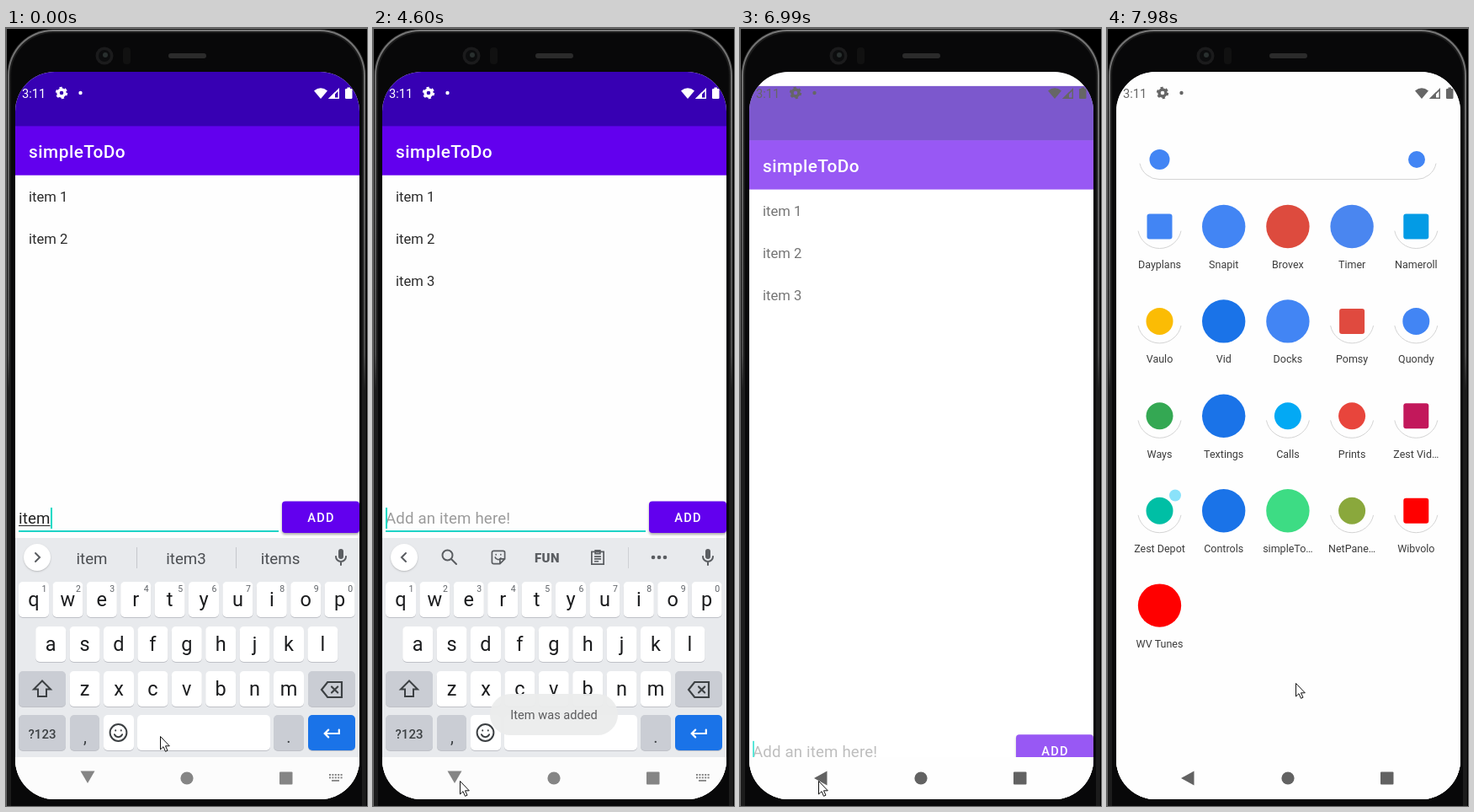
Animation, 429 px wide and 923 px high, one loop 8 s. Source, as an HTML page with a canvas:

```html
<!DOCTYPE html>
<html lang="en">
<head>
<meta charset="utf-8">
<title>simpleToDo</title>
<style>
html, body { margin: 0; width: 100%; height: 100%; overflow: hidden; background: #000; }
canvas { display: block; }
</style>
</head>
<body>
<canvas id="stage" width="429" height="923"></canvas>
<script>
const c = document.getElementById('stage').getContext('2d');
const LOOP = 8000;

const moments = [0, 1410];
for (const [a, b, n] of [[610, 1130, 4], [1840, 2770, 8], [2920, 3040, 2], [3310, 3670, 4],
  [3940, 4870, 8], [5020, 5600, 5], [5910, 6870, 8], [6990, 7980, 8]])
  for (let i = 0; i < n; i++) moments.push(a + (b - a) * i / (n - 1));
const snap = t => Math.max(...moments.filter(m => m <= t + 6));

// Pointer path: [time, x, y]
const path = [[0, 183, 840], [1750, 183, 840], [2240, 368, 590], [2800, 368, 590], [3040, 352, 435],
  [3200, 352, 435], [3440, 284, 177], [3670, 268, 430], [3800, 268, 430], [4560, 103, 893],
  [5850, 103, 893], [6090, 189, 555], [6310, 111, 893], [6460, 111, 893], [6870, 93, 893],
  [7200, 93, 893], [7900, 224, 777]];

const clamp = v => Math.min(1, Math.max(0, v));

function pointerAt(t) {
  const i = path.findIndex(p => p[0] > t);
  if (i < 0) return path[path.length - 1].slice(1);
  const [t0, x0, y0] = path[i - 1], [t1, x1, y1] = path[i];
  const k = (t - t0) / (t1 - t0);
  return [Math.round(x0 + (x1 - x0) * k), Math.round(y0 + (y1 - y0) * k)];
}

function rect(x, y, w, h, color) {
  c.fillStyle = color;
  c.fillRect(x, y, w, h);
}

function round(x, y, w, h, r, color) {
  c.fillStyle = color;
  c.beginPath();
  c.roundRect(x, y, w, h, r);
  c.fill();
}

const disc = (x, y, r, color) => round(x - r, y - r, 2 * r, 2 * r, r, color);

function shape(d, color) {
  c.fillStyle = color;
  c.fill(new Path2D(d));
}

function text(s, x, y, size, color, { align = 'left', weight = 400, spacing = 0 } = {}) {
  c.font = `${weight} ${size}px Roboto, sans-serif`;
  c.textAlign = align;
  c.letterSpacing = spacing + 'px';
  c.fillStyle = color;
  c.fillText(s, x, y);
}

const center = (s, x, y, size, color, more) => text(s, x, y, size, color, { align: 'center', ...more });

// Line icon on a 24-unit grid
function icon(d, x, y, color, scale = 1, width = 2) {
  c.save();
  c.translate(x - 12 * scale, y - 12 * scale);
  c.scale(scale, scale);
  c.strokeStyle = color;
  c.lineWidth = width;
  c.lineCap = 'round';
  c.stroke(new Path2D(d));
  c.restore();
}

function withShadow(color, blur, dy, draw) {
  c.save();
  c.shadowColor = color;
  c.shadowBlur = blur;
  c.shadowOffsetY = dy;
  draw();
  c.restore();
}

// Lower rim of a pill whose end caps sit at x0 and x1
function rim(x0, x1, y, r) {
  c.strokeStyle = '#d4d4d4';
  c.lineWidth = 1;
  c.beginPath();
  c.arc(x1, y, r, 0.2, Math.PI / 2);
  c.arc(x0, y, r, Math.PI / 2, Math.PI - 0.2);
  c.stroke();
}

function drawBody() {
  rect(0, 0, 429, 923, '#000');
  const edge = c.createLinearGradient(0, 0, 0, 430);
  edge.addColorStop(0, '#777');
  edge.addColorStop(0.9, '#4a4a4a');
  edge.addColorStop(1, '#1c1c1c');
  [[1, '#1a1a1a'], [2, edge], [4, '#1c1c1c'], [6, '#080809']].forEach(([inset, color]) =>
    round(inset, inset, 429 - 2 * inset, 980, 56 - inset, color));
  rect(0, 0, 429, 1, '#777');
  rect(0, 0, 1, 923, '#666');
  disc(117, 33, 10.5, '#1b1b1c');
  disc(117, 33, 7, '#0c0d0e');
  disc(118, 32, 3, '#29302f');
  round(139, 23, 9, 20, 4, '#111');
  round(193, 30, 45, 6, 3, '#2b2b2b');
}

function drawStatus(color) {
  text('3:11', 19, 83, 14.6, color);
  c.strokeStyle = color;
  c.lineWidth = 3.4;
  c.beginPath();
  c.arc(66, 77, 4, 0, 7);
  c.stroke();
  c.lineWidth = 2.4;
  c.setLineDash([3.1, 3.18]);
  c.beginPath();
  c.arc(66, 77, 6, 0, 2 * Math.PI);
  c.stroke();
  c.setLineDash([]);
  disc(88.5, 77, 2.2, color);
  shape('M366 74.5Q374 68 382 74.5L374 84Z', color);
  shape('M383 84L396 71V84ZM391 82.5H394.5V75L391 78.5Z', color);
  shape('M383 84L391 76V84Z', color);
  round(403, 72, 8.5, 12, 1.2, color);
  rect(405.5, 70.5, 3.5, 2, color);
}

function drawNav(bg, color, down) {
  rect(11, 865, 409, 50, bg);
  shape(down ? 'M88.5 881.5H105.5L97 896Z' : 'M88 890L103.5 881.5V898.5Z', color);
  disc(215, 890, 7.6, color);
  round(325, 882.5, 15.5, 15, 1, color);
  if (!down) return;
  for (let i = 0; i < 10; i++) rect(384 + i % 5 * 3.4, 885 + (i > 4) * 3.4, 2, 2, color);
  rect(387, 892, 9, 1.8, color);
}

function drawKey(x, y, w, color = '#fff') {
  round(x, y + 1, w, 42, 5, '#bfc1c7');
  round(x, y, w, 42, 5, color);
}

function drawStrip(words) {
  const ink = '#5a5d61', mid = 628;
  withShadow('#0003', 2, 1, () => disc(37, mid, 16, '#fff'));
  icon(words ? 'M10 7l5 5-5 5' : 'M14 7l-5 5 5 5', 37, mid, ink);
  icon('M6 11a6 6 0 0 0 12 0M12 17.5V21', 398, mid, ink);
  icon('M12 5V11', 398, mid, ink, 1, 6);
  if (words) {
    words.forEach((w, i) => center(w, 102 + 112 * i, 635.5, 18.7, '#4b4e52'));
    for (const x of [155, 273]) rect(x, 616, 1, 25, '#c6c8cc');
    return;
  }
  icon('M14.5 14.5L20 20M15.5 9.5a6 6 0 1 1-12 0a6 6 0 1 1 12 0', 91, mid, ink);
  icon('M4 6a2 2 0 0 1 2-2h12a2 2 0 0 1 2 2v8l-6 6H6a2 2 0 0 1-2-2zM20 14h-6v6M9 8.5v.2M15 8.5v.2M8 12a4 4 0 0 0 7 1', 149, mid, ink, 0.95, 1.8);
  center('FUN', 207, 633.5, 15, ink, { weight: 900, spacing: 0.5 });
  icon('M4.5 5h15v15.5h-15zM9 3.5h6v4H9zM8.5 11h7M8.5 14h7M8.5 17h4', 267, mid, ink, 0.95, 1.8);
  rect(303, 616, 1, 25, '#cfd1d5');
  for (const x of [333, 340, 347]) disc(x, mid, 2.3, ink);
}

function drawKeyboard(words) {
  const gray = '#cacdd4', ink = '#3c4043';
  rect(11, 605, 409, 261, '#e8eaed');
  drawStrip(words);
  [['qwertyuiop', 33], ['asdfghjkl', 53.2], ['zxcvbnm', 93.6]].forEach(([row, x0], r) => {
    [...row].forEach((ch, i) => {
      const x = x0 + i * 40.4, y = 657 + r * 53;
      drawKey(x - 18, y, 36);
      center(ch, x, y + 28.5, 23.5, '#1b1c1e');
      if (!r) center((i + 1) % 10, x + 12.5, 669, 10.5, '#5f6368');
    });
  });
  drawKey(15, 763, 56, gray);
  icon('M12 2.5L2 12.5h5v8.5h10v-8.5h5z', 43, 784, ink);
  drawKey(359, 763, 56, gray);
  icon('M8 4.5h14v15H8L2 12zM12 9l6 6M18 9l-6 6', 387, 785, ink, 1.2, 1.8);
  drawKey(15, 815, 56, gray);
  center('?123', 43, 843, 15, ink, { weight: 500 });
  drawKey(76, 815, 35, gray);
  center(',', 94, 848, 20, ink);
  drawKey(116, 815, 36);
  icon('M21 12a9 9 0 1 1-18 0a9 9 0 1 1 18 0M9 9.5v.2M15 9.5v.2M7.8 14a4.6 4.6 0 0 0 8.4 0', 133.5, 836, ink, 1.1, 1.8);
  drawKey(156, 815, 158);
  drawKey(318, 815, 36, gray);
  center('.', 336, 848, 20, ink);
  drawKey(359, 815, 56, '#1a73e8');
  icon('M20 8v4H4.5M8.5 8l-4 4 4 4', 387, 837, '#fff', 1.1);
}

function drawApp(t, dy) {
  const added = t >= 2500, typing = t < 5010;
  c.save();
  c.translate(0, dy);
  rect(11, 175, 409, 740, '#fefefe');
  rect(11, 52, 409, 65, '#3700b3');
  rect(11, 116.4, 409, 58.3, '#6200ee');
  text('simpleToDo', 27, 154, 20.8, '#fff', { weight: 500, spacing: 0.5 });
  for (let i = 0; i < (added ? 3 : 2); i++) text('item ' + (i + 1), 27, 206 + 50 * i, 16.65, '#2b2b2b');

  if (!typing) c.translate(0, 260);
  const entry = added ? '' : t < 600 ? 'item' : t < 950 ? 'item ' : 'item 3';
  text(entry || 'Add an item here!', 15, 588, 18.7, entry ? '#222' : '#9b9b9b', { spacing: 0.15 });
  const width = entry ? c.measureText(entry).width : 0;
  if (entry === 'item') rect(15, 590, width, 1, '#222');
  rect(15, 596, 309, 2, '#1fd3c6');
  const since = t - (added ? 2500 : 910);
  if (since < 0 || since % 1000 < 500) rect(15 + Math.round(width), 569, 2, 25, '#03dac5');

  const pressed = t > 2300 && t < 2600;
  withShadow('#0005', 3, 2, () => round(328, 561.5, 92, 37.5, 4, pressed ? '#7e33f1' : '#6200ee'));
  center('ADD', 374.5, 586, 14.6, '#fff', { weight: 500, spacing: 1.3 });
  c.restore();
}

function drawToast(t) {
  c.save();
  c.globalAlpha = clamp((t - 2400) / 400);
  round(139, 790, 152, 49, 24.5, '#ebecedf2');
  center('Item was added', 215, 820, 14.6, '#5c5c5e');
  c.restore();
}

// Launcher entries: [label, color, form]; form 'full' fills the disc, others sit on a white plate
const apps = [
  ['Dayplans', '#4285f4', 'square'], ['Snapit', '#4285f4', 'full'], ['Brovex', '#dd4b3e', 'full'],
  ['Timer', '#4a86f0', 'full'], ['Nameroll', '#039be5', 'square'],
  ['Vaulo', '#fbbc04', 'round'], ['Vid', '#1a73e8', 'full'], ['Docks', '#4285f4', 'full'],
  ['Pomsy', '#e04a3f', 'square'], ['Quondy', '#4285f4', 'round'],
  ['Ways', '#34a853', 'round'], ['Textings', '#1a73e8', 'full'], ['Calls', '#03a9f4', 'round'],
  ['Prints', '#e8453c', 'round'], ['Zest Vid…', '#c2185b', 'square'],
  ['Zest Depot', '#00bfa5', 'round'], ['Controls', '#1a73e8', 'full'], ['simpleTo…', '#3ddc84', 'full'],
  ['NetPane…', '#8aa83c', 'round'], ['Wibvolo', '#ff0000', 'square'],
  ['WV Tunes', '#ff0000', 'full']
];

function drawLauncher(p) {
  c.save();
  c.globalAlpha = p;
  c.translate(0, -52 * (1 - p));
  rim(62, 368, 156, 23.5);
  disc(62.5, 156, 12, '#4285f4');
  disc(368, 156, 10, '#4285f4');
  apps.forEach(([label, color, form], i) => {
    const x = 62.5 + i % 5 * 76.2, y = 235.5 + Math.floor(i / 5) * 112.4;
    if (form === 'full') disc(x, y, 25.7, color);
    else rim(x, x, y, 26);
    if (form === 'square') round(x - 15, y - 15, 30, 30, 3, color);
    if (form === 'round') disc(x, y, 16, color);
    center(label, x, y + 49.5, 12.5, '#3c3c3c');
  });
  disc(81, 554.5, 7, '#8ae2fa');
  c.restore();
}

function drawPointer(x, y) {
  const arrow = new Path2D('M.5 .5V16L4 12.7L6.5 18.3L9 17.2L6.5 11.8H11.3Z');
  c.save();
  c.translate(x, y);
  c.fillStyle = '#fff';
  c.strokeStyle = '#111';
  c.lineWidth = 1;
  c.fill(arrow);
  c.stroke(arrow);
  c.restore();
}

function draw(t) {
  drawBody();
  c.save();
  c.beginPath();
  c.roundRect(11, 52, 409, 863, 47);
  c.clip();
  rect(11, 52, 409, 863, '#fefefe');
  const leaving = t > 6980;
  if (leaving) {
    // The app slides down while a white veil fades it out
    const out = clamp((t - 6900) / 262);
    drawApp(t, 143 * out * out);
    c.globalAlpha = out;
    rect(11, 52, 409, 863, '#fefefe');
    c.globalAlpha = 1;
    drawLauncher(clamp((t - 7100) / 240));
    drawNav('#fefefe', '#626262');
  } else {
    drawApp(t, 0);
    const slide = clamp((t - 4950) / 200);
    if (slide < 1) {
      c.save();
      c.translate(0, slide * 261);
      drawKeyboard(t >= 2500 ? null : t < 600 ? ['item', 'item3', 'items'] : t < 950 ? ['is', '1', '2'] : ['3', '3rd', '30']);
      c.restore();
    }
    if (t < 5010) drawNav('#fcfcfc', '#858585', true);
    else drawNav('#000', '#fff');
    if (t >= 2500 && t < 5010) drawToast(t);
  }
  drawStatus(leaving ? '#666' : '#fff');
  c.restore();
  drawPointer(...pointerAt(t));
}

function tick() {
  draw(snap(performance.now() % LOOP));
  requestAnimationFrame(tick);
}
tick();
</script>
</body>
</html>
```
